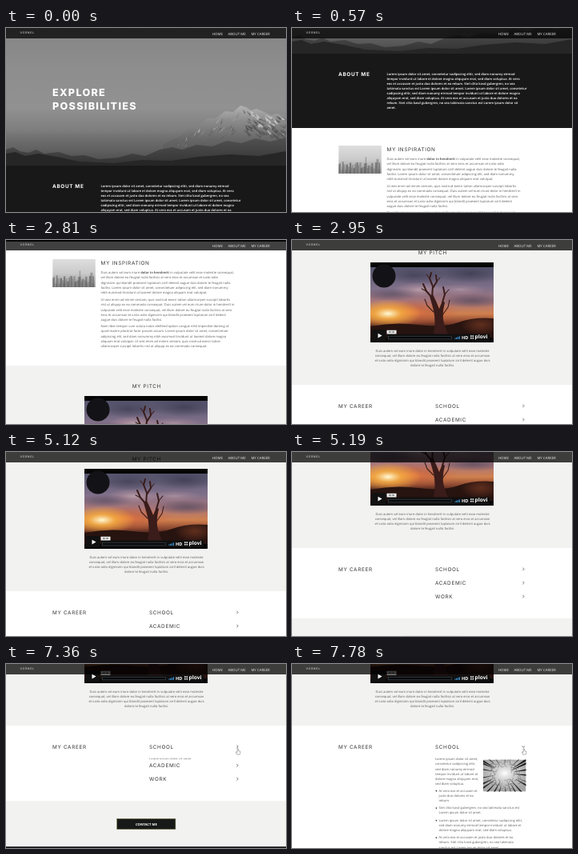
An HTML page that plays this animation: 350x230 px, repeating every 8000 ms.

```html
<!DOCTYPE html>
<html lang="en">
<head>
<meta charset="utf-8">
<title>Portfolio page</title>
<style>
html, body { margin: 0; width: 100%; height: 100%; overflow: hidden; background: #fff; }
svg { display: block; width: 100vw; height: 100vh; }
text { white-space: pre; text-rendering: geometricPrecision; font-family: "Open Sans", "Noto Sans", sans-serif; }
.body { font-size: 4.06px; fill: #5c5c5c; }
.about { font-size: 4.06px; font-weight: 600; fill: #fff; }
.head { font: 400 6.4px Inter, sans-serif; letter-spacing: .66px; fill: #38383c; }
.bold { font-weight: 700; }
.hero { font: 800 12.6px Inter, sans-serif; letter-spacing: 1.3px; fill: #fff; }
.brand { font: 500 3.6px Inter, sans-serif; letter-spacing: .62px; fill: #ccc; }
.nav { font-size: 4.4px; fill: #eee; }
.mid { text-anchor: middle; }
.chev { fill: none; stroke: #333; stroke-width: .7; }
</style>
</head>
<body>
<svg id="stage" viewBox="0 0 350 230" preserveAspectRatio="none"></svg>
<script>
const LINE = 6.05;
let seed = 7;
const rnd = () => (seed = seed * 16807 % 2147483647) / 2147483647;
const between = (a, b) => a + (b - a) * rnd();

const text = (x, y, s, cls, style = '') =>
  `<text x="${x}" y="${y}" class="${cls}" style="${style}">${s}</text>`;
const lines = (x, y, s, cls = 'body') =>
  s.split('|').map((l, i) => text(x, y + i * LINE, l, cls)).join('');
const rect = (x, y, w, h, fill, more = '') =>
  `<rect x="${x}" y="${y}" width="${w}" height="${h}" fill="${fill}" ${more}/>`;
const path = (d, fill, more = '') => `<path d="${d}" fill="${fill}" ${more}/>`;
const oval = (x, y, rx, ry, fill, a = 1) =>
  `<ellipse cx="${x}" cy="${y}" rx="${rx}" ry="${ry}" fill="${fill}" opacity="${a}"/>`;
const group = (x, y, inner, id = '') =>
  `<g ${id && `id="${id}"`} transform="translate(${x} ${y})">${inner}</g>`;
const grad = (id, ...stops) => `<linearGradient id="${id}" x2="0" y2="1">` +
  stops.map(([o, c, a = 1]) => `<stop offset="${o}" stop-color="${c}" stop-opacity="${a}"/>`).join('') +
  '</linearGradient>';
const glow = (id, c, mid) => `<radialGradient id="${id}"><stop stop-color="${c}"/>` +
  `<stop offset=".4" stop-color="${mid}" stop-opacity=".75"/><stop offset="1" stop-color="${mid}" stop-opacity="0"/></radialGradient>`;
const chevron = (y, id) =>
  `<g transform="translate(289.3 ${y})"><path ${id ? `id="${id}"` : ''} class="chev" d="M-.9-1.7L.8 0L-.9 1.7"/></g>`;

const RIDGE = 'M196 146L206 140L216 136L224 129L232 123L240 123L251 113L262 113L274 104L284 105L293 97L300 99L306 103L313 101L323 105L331 109L339 107L350 112V172H196Z';
const defs = '<defs>' +
  grad('sky', [0, '#858585'], [.3, '#8e8e8e'], [.58, '#919191'], [.74, '#7e7e7e'], [.88, '#646464'], [1, '#444']) +
  grad('peak', [0, '#b4b4b4'], [.25, '#8c8c8c'], [.5, '#707070'], [.68, '#565656'], [1, '#3a3a3a']) +
  grad('hill', [0, '#4a4a4a'], [1, '#2a2a2a']) +
  grad('mist', [0, '#707070', 0], [.5, '#626262', .75], [1, '#484848', .9]) +
  grad('fog', [0, '#dedede'], [.5, '#cacaca'], [1, '#929292']) +
  grad('dusk', [0, '#55556d'], [.3, '#80708a'], [.5, '#a97678'], [.66, '#d0804e'], [.78, '#8a4630'], [.88, '#2c1614'], [1, '#120a0c']) +
  glow('sun', '#fffbd8', '#fbb440') + glow('light', '#fff', '#ddd') +
  glow('dark', '#3b3a50', '#44425a') + glow('pale', '#d9bfc0', '#c09aa2') + glow('ember', '#e8703a', '#c8603c') +
  `<clipPath id="ridge"><path d="${RIDGE}"/></clipPath>` +
  '<clipPath id="film"><rect y="6" width="154" height="88"/></clipPath>' +
  '<clipPath id="photo"><rect width="53.5" height="40"/></clipPath>' +
  '<clipPath id="fold"><rect id="foldBox" y="36" width="350" height="0"/></clipPath></defs>';

// Rock and snow streaks run down both sides of the summit.
let rocks = '';
for (let i = 0; i < 150; i++) {
  const x = between(215, 350), top = 98 + Math.abs(x - 295) * (x < 295 ? .5 : .24), y = top + between(0, 30);
  const lean = (x < 295 ? -1 : 1) * between(2, 8), h = between(3, 9), w = between(.8, 3);
  const snow = rnd() < .6 - (y - top) / 40;
  rocks += path(`M${x} ${y}l${lean} ${h}l${w} ${-h / 3}Z`, snow ? '#dedede' : '#454545', `opacity="${snow ? .6 : .5}"`);
}

const hero = rect(0, 0, 350, 172, 'url(#sky)') + path(RIDGE, 'url(#peak)') +
  `<g clip-path="url(#ridge)">${rocks}</g>` + rect(0, 128, 350, 44, 'url(#mist)') +
  path('M0 152L9 149L17 154L28 156L38 152L48 157L66 155L82 160L98 159L116 164L140 162L158 157L174 160L192 152L208 149L220 152L238 146L258 148L276 141L294 144L312 138L330 142L350 137V172H0Z', 'url(#hill)', 'opacity=".75"') +
  path('M0 157L12 155L24 160L40 157L64 161L92 167L135 169L170 165L206 166L240 161L280 158L316 160L350 154V172H0Z', '#262626') +
  text(58, 85, 'EXPLORE', 'hero') + text(58, 102.3, 'POSSIBILITIES', 'hero');

const about = rect(0, 172, 350, 93, '#181818') + text(58, 200.4, 'ABOUT ME', 'head bold', 'fill:#fff') +
  lines(118.5, 198.9, 'Lorem ipsum dolor sit amet, consetetur sadipscing elitr, sed diam nonumy eirmod|tempor invidunt ut labore et dolore magna aliquyam erat, sed diam voluptua. At vero|eos et accusam et justo duo dolores et ea rebum. Stet clita kasd gubergren, no sea|takimata sanctus est Lorem ipsum dolor sit amet. Lorem ipsum dolor sit amet, consetetur|sadipscing elitr, sed diam nonumy eirmod tempor invidunt ut labore et dolore magna|aliquyam erat, sed diam voluptua. At vero eos et accusam et justo duo dolores et ea|rebum. Stet clita kasd gubergren, no sea takimata sanctus est Lorem ipsum dolor sit|amet.', 'about');

let city = rect(0, 0, 53.5, 35, 'url(#fog)');
for (let i = 0; i < 34; i++) {
  const h = between(4, 15) + (i % 9 === 4 ? 7 : 0), w = between(1.2, 3.4);
  city += rect(i * 1.52, 35 - h, Math.min(w, 53.5 - i * 1.52), h, i % 3 ? '#777' : '#4e4e4e', 'opacity=".55"');
}

const inspiration = rect(0, 0, 350, 156, '#fff') + group(58.3, 22, city) +
  text(118.5, 29.3, 'MY INSPIRATION', 'head') +
  lines(118.5, 40.4, 'Duis autem vel eum iriure <tspan class="bold">dolor in hendrerit</tspan> in vulputate velit esse molestie consequat,|vel illum dolore eu feugiat nulla facilisis at vero eros et accumsan et iusto odio|dignissim qui blandit praesent luptatum zzril delenit augue duis dolore te feugait nulla|facilisi. Lorem ipsum dolor sit amet, consectetuer adipiscing elit, sed diam nonummy|nibh euismod tincidunt ut laoreet dolore magna aliquam erat volutpat.') +
  lines(118.5, 74.4, 'Ut wisi enim ad minim veniam, quis nostrud exerci tation ullamcorper suscipit lobortis|nisl ut aliquip ex ea commodo consequat. Duis autem vel eum iriure dolor in hendrerit in|vulputate velit esse molestie consequat, vel illum dolore eu feugiat nulla facilisis at vero|eros et accumsan et iusto odio dignissim qui blandit praesent luptatum zzril delenit|augue duis dolore te feugait nulla facilisi.') +
  lines(118.5, 107.4, 'Nam liber tempor cum soluta nobis eleifend option congue nihil imperdiet doming id|quod mazim placerat facer possim assum. Lorem ipsum dolor sit amet, consectetuer|adipiscing elit, sed diam nonummy nibh euismod tincidunt ut laoreet dolore magna|aliquam erat volutpat. Ut wisi enim ad minim veniam, quis nostrud exerci tation|ullamcorper suscipit lobortis nisl ut aliquip ex ea commodo consequat.');

const limbs = (d, w) => path(d, 'none', `stroke="#3a1c1a" stroke-width="${w}" stroke-linecap="round" stroke-linejoin="round"`);
const video = rect(0, 0, 154, 100, '#050505') + '<g clip-path="url(#film)">' +
  rect(0, 6, 154, 88, 'url(#dusk)') +
  oval(55, 16, 40, 11, 'url(#dark)', .7) + oval(125, 14, 45, 12, 'url(#dark)', .8) +
  oval(62, 34, 34, 9, 'url(#pale)', .6) + oval(112, 34, 34, 7, 'url(#pale)', .4) +
  oval(25, 40, 36, 8, 'url(#dark)', .45) + oval(128, 48, 42, 9, 'url(#dark)', .55) +
  oval(50, 62, 60, 16, 'url(#ember)', .75) + oval(22, 64, 42, 18, 'url(#sun)') +
  path('M0 80Q30 74 60 78T110 75T154 70V94H0Z', '#27130f') +
  oval(138, 78, 26, 13, 'url(#ember)', .3) +
  path('M79 90Q82 74 79 60L74 42L78 40Q83 50 86 58L90 48L93 50Q89 66 92 76L97 90Z', '#3a1c1a') +
  limbs('M77 44L70 36L66 27M77 44L78 30L74 20L76 13M78 32L83 24L82 16M90 50L93 40L91 31', 2) +
  limbs('M79 62L71 54L68 46M90 66L97 56L99 47M70 36L64 33M93 40L98 34M74 20L70 15M83 24L87 19', 1.1) +
  '</g><circle cx="17" cy="17" r="14.5" fill="#131216"/>' +
  rect(2, 84, 17.5, 14, '#111', 'rx="1.5"') + path('M9.5 88.8L14.6 91.5L9.5 94.4Z', '#fff') +
  rect(21, 89.5, 128, 8.5, '#111', 'rx="1.5"') +
  rect(22.5, 92.4, 79, 3.4, '#07080a', 'stroke="#4a565e" stroke-width=".5"') +
  rect(20.5, 84.8, 12, 4.6, '#eee', 'rx=".5"') + text(26.5, 88.3, '00:00', 'mid', 'font-size:3px') +
  [0, 1, 2, 3, 4].map(i => rect(105.5 + i * 1.4, 94.4 - i * .55, .9, 1.6 + i * .55, '#3b8fd0')).join('') +
  text(114, 95.6, 'HD', 'bold', 'font-size:5.6px;fill:#fff') +
  [0, 1, 2, 3].map(i => rect(125 + i % 2 * 2.5, 91.3 + (i >> 1) * 2.6, 1.6, 1.6, '#fff')).join('') +
  text(130.6, 95.4, 'plovi', 'bold', 'font-size:6.6px;fill:#fff');

const pitch = rect(0, 0, 350, 192, '#f2f2f1') + text(175.8, 28, 'MY PITCH', 'head mid') +
  group(98, 38, video) +
  lines(175.5, 149.9, 'Duis autem vel eum iriure dolor in hendrerit in vulputate velit esse molestie|consequat, vel illum dolore eu feugiat nulla facilisis at vero eros et accumsan|et iusto odio dignissim qui blandit praesent luptatum zzril delenit augue duis|dolore te feugait nulla facilisi.', 'body mid');

let trees = rect(0, 0, 53.5, 40, '#a4a4a4') + oval(27, 17, 31, 23, 'url(#light)');
for (let i = 0; i < 26; i++) {
  const a = i / 26 * Math.PI * 2 + between(0, .2), r = between(7, 16), c = Math.cos(a), s = Math.sin(a), w = between(.5, 2.1);
  const at = (d, o) => `${(27 + c * d - s * o).toFixed(1)} ${(17 + s * d + c * o).toFixed(1)}`;
  trees += path(`M${at(r, 0)}L${at(42, w)}L${at(42, -w)}Z`, '#1d1d1d') +
    path(`M${at(r + 3, 0)}L${at(r, 3)}M${at(r + 6, 0)}L${at(r + 3, -4)}M${at(r + 9, 0)}L${at(r + 6, 4)}`, 'none', 'stroke="#444" stroke-width=".35"');
}

const bullet = (y, s) => `<circle cx="180.4" cy="${y - 1.3}" r=".85" fill="#333"/>` + lines(183.5, y, s);
const school = lines(179, 43.4, 'Lorem ipsum dolor sit amet,|consetetur sadipscing elitr,|sed diam nonumy eirmod|tempor invidunt ut labore et|dolore magna aliquyam erat,|sed diam voluptua.') +
  group(239, 42.5, `<g clip-path="url(#photo)">${trees}</g>`) +
  bullet(82.9, 'At vero eos et accusam et|justo duo dolores et ea|rebum.') +
  bullet(104.4, 'Stet clita kasd gubergren, no sea takimata sanctus est|Lorem ipsum dolor sit amet.') +
  bullet(119.9, 'Lorem ipsum dolor sit amet, consetetur sadipscing elitr,|sed diam nonumy eirmod tempor invidunt ut labore et|dolore magna aliquyam erat, sed diam voluptua.') +
  bullet(141.4, 'At vero eos et accusam et justo duo dolores et ea|rebum. Stet clita kasd gubergren, no sea takimata|sanctus est Lorem ipsum dolor sit amet.');

const foot = rect(0, 88, 350, 57.2, '#f2f2f1') + rect(0, 145, 350, 160, '#181818') +
  rect(138.7, 110.2, 73.2, 13.2, '#171918', 'stroke="#77743f" stroke-width=".5"') +
  text(175.4, 118.4, 'CONTACT ME', 'mid bold', 'font-size:4.2px;fill:#fff');

const career = rect(0, 0, 350, 240, '#fff') + text(58, 28.6, 'MY CAREER', 'head') +
  text(179, 28.6, 'SCHOOL', 'head') + chevron(26.4, 'arrow') +
  `<g clip-path="url(#fold)">${school}</g>` +
  group(0, 0, text(179, 45.7, 'ACADEMIC', 'head') + chevron(43.5) +
    text(179, 62.7, 'WORK', 'head') + chevron(60.5) + foot, 'rest');

const header = rect(0, 0, 350, 13, '#000', 'opacity=".75"') + text(17.5, 7, 'VORNEL', 'brand') +
  text(257.8, 8.6, 'HOME', 'nav') + text(277.4, 8.6, 'ABOUT ME', 'nav') + text(306.4, 8.6, 'MY CAREER', 'nav');

const outline = 'stroke="#555" stroke-width=".45" stroke-linejoin="round"';
const pointer = group(0, 0,
  `<g id="tip">${path('M0 0V5L1.2 4L2 5.8L2.8 5.4L2 3.8H3.5Z', '#fff', outline)}</g>` +
  `<g id="hand">${path('M-.7 .4Q0-.4 .6 .4V3L3 3.6V6L2.4 7.6H-1L-2.5 4.7L-1.9 4.2L-.7 5Z', '#fff', outline)}</g>`, 'pointer');

const $ = id => document.getElementById(id);
$('stage').innerHTML = defs + group(0, 0, hero + about + group(0, 265, inspiration) +
  group(0, 420, pitch) + group(0, 611, career), 'page') + header + pointer;

const LOOP = 8000, STEP = 70, FOLD = 125;
const scrolls = [[0, 0], [500, 35], [570, 140], [640, 223], [2810, 263], [2880, 352],
  [2950, 430], [5120, 437], [5190, 491], [5260, 534]];
const swing = p => .5 - Math.cos(Math.PI * Math.min(1, Math.max(0, p))) / 2;
const mix = (a, b, p) => a + (b - a) * p;
const move = (el, x, y) => el.setAttribute('transform', `translate(${x} ${y})`);

function draw(now) {
  const raw = now % LOOP;
  const t = raw < 10 ? 0 : 10 + Math.floor((raw - 10) / STEP) * STEP;
  move($('page'), 0, -scrolls.findLast(s => t >= s[0])[1]);

  const enter = swing((t - 5540) / 210), climb = swing((t - 6100) / 560);
  const x = mix(mix(327, 303, enter), 289.8, climb);
  const y = mix(mix(181, 159, enter), 107.5, climb) - (t >= 6940 ? 2 : t >= 6870 ? 1 : 0);
  const over = y < 112;
  move($('pointer'), x, y);
  $('pointer').style.display = t >= 5540 ? '' : 'none';
  $('tip').style.display = over ? 'none' : '';
  $('hand').style.display = over ? '' : 'none';

  const open = swing((t - 7290) / 490);
  $('foldBox').setAttribute('height', FOLD * open);
  move($('rest'), 0, FOLD * open);
  $('arrow').setAttribute('transform', `rotate(${90 * open})`);
}

const start = performance.now();
(function tick() {
  draw(performance.now() - start);
  requestAnimationFrame(tick);
})();
</script>
</body>
</html>
```
